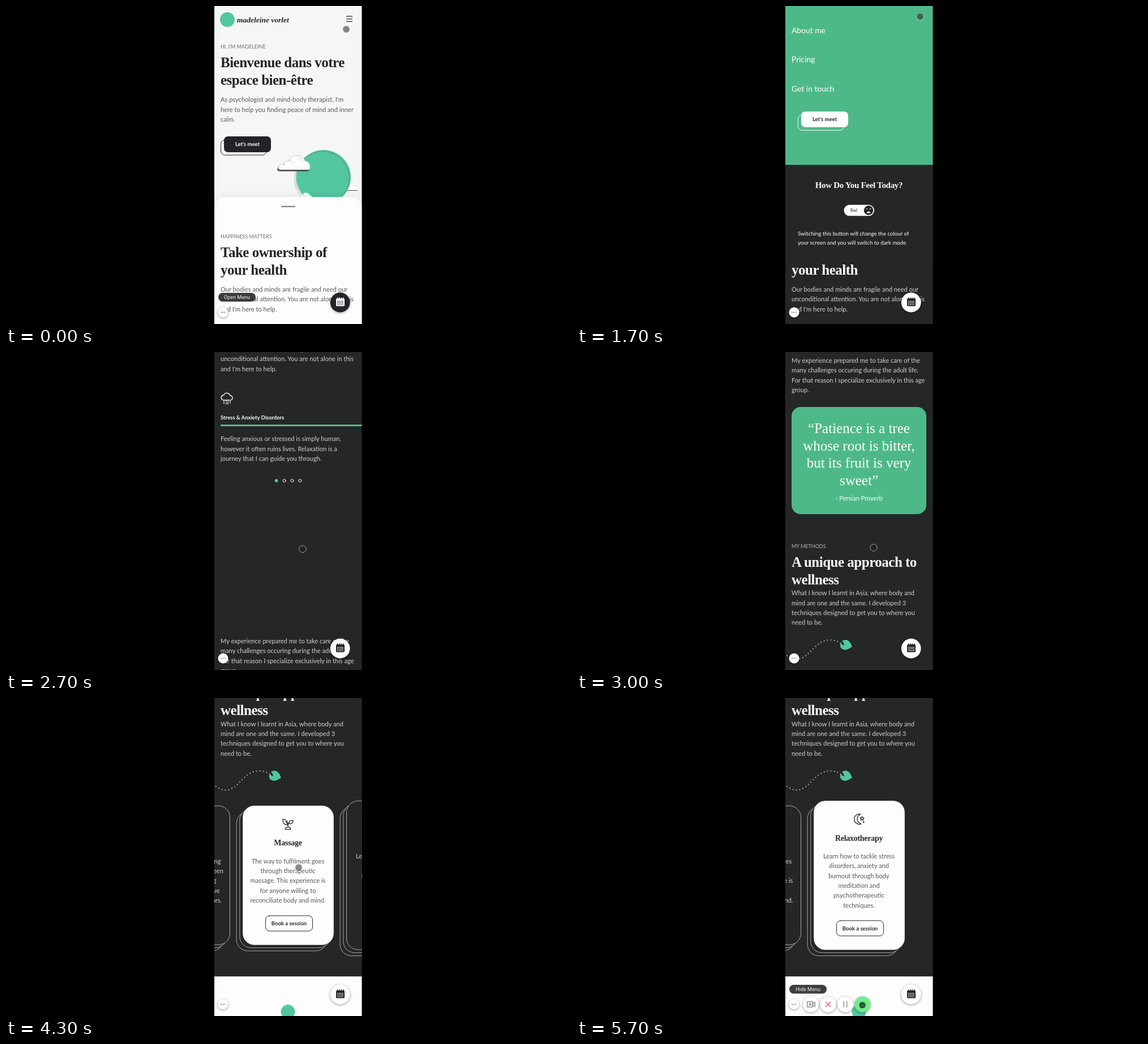
An HTML page for the animation above (5800 ms loop, 998 by 561 pixels).

```html
<!DOCTYPE html>
<html lang="en">
<head>
<meta charset="utf-8">
<title>Therapist site on a phone</title>
<style>
html, body { margin: 0; width: 100%; height: 100%; overflow: hidden; background: #000; }
svg { display: block; }
#stage {
  --hero: #f5f6f6; --sheet: #fdfdfd; --ink: #222426; --copy: #55585a; --soft: #6c6f71;
  --bar: #777; --cloud: #fcfcfc; --shade: #3a3c40; --btn: #232427; --btnInk: #fff;
}
#stage.dark {
  --hero: #1f2123; --sheet: #252727; --ink: #fbfbf8; --copy: #d0d1cf; --soft: #b4b5b2;
  --bar: #b9b7a6; --btn: #fdfdfd; --btnInk: #232427;
}
text { font: 11.09px Lato, sans-serif; fill: var(--copy); }
.h { font: bold 25px "Liberation Serif", serif; letter-spacing: -.02em; fill: var(--ink); }
.h.mid { font-size: 15px; }
.card .h { font-size: 14px; }
.quote { font: 25px "Liberation Serif", serif; fill: #fff; }
.cap { font-size: 9px; fill: var(--soft); }
.bold { font-size: 9.5px; font-weight: bold; fill: var(--ink); }
.name { font: italic bold 13.5px "Liberation Serif", serif; fill: var(--ink); }
.nav { font-size: 13.86px; fill: #fff; }
.note { font-size: 9.7px; fill: var(--ink); }
.mood { font-size: 7px; fill: var(--btnInk); }
.tip { font: 9px Roboto, sans-serif; fill: #eee; }
.mid { text-anchor: middle; }
.white { fill: #fff; }
.black { fill: #222426; }
.line { fill: none; stroke: var(--ink); stroke-width: 1.3; stroke-linecap: round; stroke-linejoin: round; }
.btn { fill: var(--btn); }
.btnInk { fill: var(--btnInk); }
.puff { fill: var(--cloud); }
.shadow { filter: drop-shadow(0 1px 2px #0006); }
.card { --ink: #e4e4e2; --copy: #d0d1cf; }
.card.on { --ink: #26282b; --copy: #55585a; }
.edge { fill: var(--sheet); stroke: #b9bab8; stroke-width: .9; }
</style>
</head>
<body>
<svg id="stage" width="998" height="561" viewBox="0 0 998 561"></svg>
<script>
const GREEN = '#4eb988', MINT = '#52c79f';
const stage = document.getElementById('stage');
const $ = id => document.getElementById(id);

const text = (x, y, s, cls = '') => `<text x="${x}" y="${y}" class="${cls}">${s}</text>`;
const lines = (x, y, list, cls = '', pitch = 17.33) =>
  list.map((s, i) => text(x, y + i * pitch, s, cls)).join('');
const rect = (x, y, w, h, r, more) =>
  `<rect x="${x}" y="${y}" width="${w}" height="${h}" rx="${r}" ${more}/>`;
const circle = (x, y, r, more) => `<circle cx="${x}" cy="${y}" r="${r}" ${more}/>`;
const path = (d, more = 'class="line"') => `<path d="${d}" ${more}/>`;
const at = (x, y, s, more = '') => `<g transform="translate(${x} ${y})" ${more}>${s}</g>`;

// Cloud with a flat base and a dark shadow down to the left
const CLOUD = 'M3 26 Q-2 25 1 19 Q4 15 10 17 Q11 9 19 10 Q23 -1 34 1 Q44 1 47 10 Q56 12 56 20 Q57 26 52 26Z';
const cloud = (x, y, k) => at(x, y, `<g transform="scale(${k})">` +
  path(CLOUD, 'fill="var(--shade)" transform="translate(-1.5 2.5)"') +
  path(CLOUD, 'class="puff" stroke="#aab" stroke-width=".6"') +
  path('M19 10 Q25 9 27 15 M34 6 Q40 5 43 12', 'fill="none" stroke="#bbc" stroke-width=".7"') + '</g>');

const hero = rect(368, 0, 261, 561, 0, 'fill="var(--hero)"') +
  circle(391, 24, 13, `fill="${MINT}"`) +
  text(408, 29, 'madeleine vorlet', 'name') +
  path('M601.5 18.2H611.5M601.5 22.8H611.5M601.5 27.4H611.5') +
  text(379, 75.3, "HI, I'M MADELEINE", 'cap') +
  lines(379, 108, ['Bienvenue dans votre', 'espace bien-être'], 'h', 30.5) +
  lines(379, 169.3, ["As psychologist and mind-body therapist, I'm",
    'here to help you finding peace of mind and inner', 'calm.']) +
  rect(379.5, 236.5, 80.5, 26.5, 7, 'class="line" style="stroke-width:1"') +
  rect(385, 230, 83, 28, 7, 'class="btn"') +
  text(426.5, 247.4, "Let's meet", 'bold mid btnInk') +
  cloud(596, 313, .46) +
  circle(561, 302, 48, `fill="${MINT}"`) +
  circle(559.5, 303.5, 47.5, 'fill="none" stroke="#4a7c70" stroke-width=".6"') +
  circle(557.5, 305, 48, 'fill="none" stroke="#8a9490" stroke-width=".6"') +
  cloud(481, 263, 1) + cloud(515, 329, .46);

const intro = circle(0, 0, 0, '') +
  text(379, 409.9, 'HAPPINESS MATTERS', 'cap') +
  lines(379, 443, ['Take ownership of', 'your health'], 'h', 30.5) +
  lines(379, 503.9, ['Our bodies and minds are fragile and need our',
    'unconditional attention. You are not alone in this', "and I'm here to help."]) +
  path('M384 590 Q380 589 380 585 Q381 581 385 581 Q386 577 390 577.5 Q395 578 396 582 Q400 582 400 586 Q400 590 396 590Z' +
    'M385 592V596M389 592V593M389 595V597M392 592V597M396 592V595') +
  text(379, 623.8, 'Stress &amp; Anxiety Disorders', 'bold') +
  rect(379, 633, 250, 3, 0, `fill="${GREEN}"`) +
  lines(379, 662.3, ['Feeling anxious or stressed is simply human,',
    'however it often ruins lives. Relaxation is a', 'journey that I can guide you through.']) +
  [0, 1, 2, 3].map(i => circle(477.6 + i * 13.9, 732, 2.5,
    i ? 'class="line" style="stroke-width:1"' : `fill="${MINT}" stroke="${MINT}"`)).join('');

const methods = lines(379, 18.9, ['My experience prepared me to take care of the',
    'many challenges occuring during the adult life.',
    'For that reason I specialize exclusively in this age', 'group.']) +
  rect(379, 97, 238, 189, 16, `fill="${GREEN}"`) +
  lines(498, 143, ['“Patience is a tree', 'whose root is bitter,', 'but its fruit is very', 'sweet”'], 'quote mid', 30.5) +
  text(498, 262, '- Persian Proverb', 'mid white') +
  text(379, 346.3, 'MY METHODS', 'cap') +
  lines(379, 379.3, ['A unique approach to', 'wellness'], 'h', 30.5) +
  lines(379, 429.3, ['What I know I learnt in Asia, where body and',
    'mind are one and the same. I developed 3',
    'techniques designed to get you to where you', 'need to be.']) +
  path('M366 532 Q378 542 389 542 C412 540 420 508 447 508 Q460 508 469 516',
    'fill="none" stroke="#e8e6d2" stroke-width="1.8" stroke-linecap="round" stroke-dasharray="0 6"') +
  path('M486 520 C481 523 477 526 473 525.5 C466 525 463 519 466 513 Q469 518 472 517 Q471 512 468 510 C475 505 482 508 486 520Z',
    `fill="${MINT}"`);

const rays = [0, 45, 90, 135, 180, 225, 270, 315]
  .map(a => `<path class="line" d="M0 -7.5V-9.5" transform="rotate(${a})"/>`).join('');
const cards = [
  ['Psychotherapy', circle(0, 0, 5.8, 'class="line"') + rays,
    ["I don't cure the mind using", "Freudian concepts. I've been", 'helping patients feeling',
      'better through alternative', 'therapies for over 20 years.']],
  ['Massage', path('M0 5Q0 -1 2 -3M0 2Q-1 -2 -4 -5M0 1Q-9 2 -9 -9Q0 -8 0 1M2 -1Q1 -7 9 -7Q9 0 2 -1M-5 9Q-4 5 0 5Q4 5 5 9Z'),
    ['The way to fulfilment goes', 'through therapeutic', 'massage. This experience is',
      'for anyone willing to', 'reconciliate body and mind.']],
  ['Relaxotherapy', path('M3 -9A9 9 0 1 0 4 8Q-3 6 -3 -1Q-3 -7 3 -9Z') +
    path('M5.5 -5L6.5 -2.8L9 -2.5L7.2 -.8L7.6 1.7L5.5 .5L3.4 1.7L3.8 -.8L2 -2.5L4.5 -2.8Z') +
    circle(8.2, 5, .8, 'class="line"'),
    ['Learn how to tackle stress', 'disorders, anxiety and', 'burnout through body',
      'meditation and', 'psychotherapeutic', 'techniques.']]
];
const card = ([title, icon, copy], i) => {
  const extra = (copy.length - 5) * 17.33, top = 1569.8 - extra / 2, h = 245 + extra;
  return at(i * 183, top, [2, 1, 0].map(k =>
      rect(418.5 - 5.7 * k, 5.4 * k, 160, h, 20, 'class="edge"')).join('') +
    rect(418.5, 0, 160, h, 20, 'fill="#fdfdfd" class="face"') +
    at(498, 32.4, icon) +
    text(498, 70, title, 'h mid') +
    lines(498, 101.3, copy, 'mid') +
    rect(458.5, 193.8 + extra, 83, 27, 7, 'class="line" style="stroke-width:1"') +
    text(500, 210.7 + extra, 'Book a session', 'bold mid'), 'class="card"');
};

const sheet = rect(368, 337, 260.5, 1600, 18, 'fill="var(--sheet)" style="filter:drop-shadow(0 -2px 6px #0001)"') +
  rect(486, 352.8, 25, 2, 1, 'fill="var(--bar)"') + intro + at(0, 1000, methods) +
  `<g id="deck">${cards.map(card).join('')}</g>` +
  rect(368, 1870.7, 261, 400, 0, 'fill="#fdfdfd"') +
  circle(498, 1933, 12.5, `fill="${MINT}"`);

let cells = '';
for (let r = 0; r < 3; r++) for (let c = 0; c < 4; c++)
  cells += rect(585.2 + c * 2.9, 520.3 + r * 2.8, 1.7, 1.6, .4, 'class="btn"');
const calendar = circle(590.2, 523, 17.4, 'class="btn shadow"') +
  rect(583, 516, 15, 13.5, 1.5, 'class="btnInk"') +
  [585, 588.4, 591.6, 595].map(x => rect(x, 514, 1.4, 3, .5, 'class="btnInk"')).join('') + cells;

const menu = rect(368, 0, 261, 393, 0, `fill="${GREEN}"`) +
  circle(391, 24, 13, 'fill="#fff"') +
  path('M602.7 19.2L609.3 25.8M609.3 19.2L602.7 25.8', 'class="line" style="stroke:#fff"') +
  lines(379, 108.6, ['Home', 'About me', 'Pricing', 'Get in touch'], 'nav', 51.5) +
  rect(390.5, 304.5, 80.5, 27, 7, 'fill="none" stroke="#fff" stroke-width=".9"') +
  rect(396, 298.5, 83, 27.5, 7, 'fill="#fff"') +
  text(437.5, 315.6, "Let's meet", 'bold mid black') +
  rect(368, 392.5, 261, 169, 0, 'fill="var(--sheet)"') +
  text(498, 433, 'How Do You Feel Today?', 'h mid') +
  rect(471.5, 463, 53.5, 19.5, 9.7, 'class="btn"') +
  '<text id="mood" y="475.2" class="mood"></text>' +
  `<g id="knob">${circle(481.5, 472.7, 8.2, 'class="btnInk"')}
    <path id="mouth" class="btn"/>
    ${path('M476.8 470.5Q478.3 468.8 479.8 470.5M483.2 470.5Q484.7 468.8 486.2 470.5', 'fill="none" stroke="var(--btn)"')}</g>` +
  lines(390, 517.4, ['Switching this button will change the colour of',
    'your screen and you will switch to dark mode'], 'note', 15.4);

// Recorder tools that spread out from the dots button
const disc = (fill = '#fff') => circle(0, 0, 14, `fill="${fill}" class="shadow"`);
const icon = (d, color) => path(d, `fill="none" stroke="${color}" stroke-width="1.4"`);
const tools = [
  disc() + icon('M-6.5 -4.5H3V4.5H-6.5ZM3 -1L7 -3.5V3.5L3 1M-4 0H1M-1.5 -2.5V2.5', '#888'),
  disc() + icon('M-4.5 -4.5L4.5 4.5M4.5 -4.5L-4.5 4.5', '#e8606a'),
  disc() + icon('M-2.8 -5.5V5.5M2.8 -5.5V5.5', '#85898f'),
  disc('#6cf088') + circle(0, 1, 6, 'fill="#2e8a4c"') + icon('M-2.5 1L-.5 3L3 -1', '#6cf088')
];
const recorder = tools.map(s => at(0, 540.5, s, 'class="tool"')).join('') +
  circle(383.5, 540.5, 9, 'fill="#fff" class="shadow"') +
  [380.2, 383.5, 386.8].map(x => circle(x, 540.3, .9, 'fill="#555"')).join('') +
  `<g id="tip">${rect(375, 506, 66, 15.5, 7.7, 'fill="#242424" fill-opacity=".88"')}
    <text id="tipText" x="408" y="516.8" class="tip mid"></text></g>`;

stage.innerHTML = `<svg x="368" width="260.5" height="561" viewBox="368 0 260.5 561">
  ${hero}<g id="sheet">${sheet}</g>${calendar}<g id="menu">${menu}</g>${recorder}
  <circle id="cursor" r="6.1" fill="#1c1c1c" fill-opacity=".52" stroke="#ccc" stroke-opacity=".75"/></svg>`;

// Keys are [time, value, ...]; values run straight between them
function track(keys, t) {
  let i = keys.findIndex(k => k[0] > t);
  if (i < 0) return keys[keys.length - 1].slice(1);
  if (!i) return keys[0].slice(1);
  const a = keys[i - 1], b = keys[i], f = (t - a[0]) / (b[0] - a[0]);
  return a.slice(1).map((v, j) => v + (b[j + 1] - v) * f);
}

const CURSOR = [[0, 601, 41], [200, 610, 26], [500, 608, 24], [700, 590, 120], [1000, 495, 476], [1200, 495, 476],
  [1500, 606, 18.5], [1700, 606, 18.5], [2200, 524, 350], [2400, 524, 350], [3000, 524, 345], [3400, 524, 345],
  [3700, 517, 299], [4800, 517, 299], [5200, 384, 540], [5400, 384, 540], [5700, 504, 542]];
const SCROLL = [[2200, 0], [2300, 80], [2400, 212.5], [2600, 450], [2800, 560], [2900, 740], [3000, 1000],
  [3100, 1130], [3200, 1215], [3300, 1260], [3400, 1278], [3600, 1365], [3700, 1379.5]];
const SWIPE = [[3700, 0], [3800, .3], [3900, .65], [4000, .85], [4200, 1], [4300, 1],
  [4400, 1.2], [4500, 1.55], [4600, 1.85], [4700, 1.95], [4900, 2]];
const MENU = [[400, 0], [500, .15], [600, .55], [700, .85], [800, 1], [1600, 1], [1700, .8], [1800, .4], [1900, .1], [2000, 0]];
const KNOB = [[1100, 0], [1300, 1]];
const TOOLS = [[5200, 0], [5300, .3], [5400, .75], [5500, 1]];

const move = (el, x, y) => el.setAttribute('transform', `translate(${x} ${y})`);
const deckCards = [...document.querySelectorAll('.card')];
const toolDiscs = [...document.querySelectorAll('.tool')];

function draw(t) {
  const [swipe] = track(SWIPE, t), [open] = track(MENU, t), [knob] = track(KNOB, t), [spread] = track(TOOLS, t);
  const dark = knob >= .5;
  stage.classList.toggle('dark', dark);
  move($('sheet'), 0, -track(SCROLL, t)[0]);
  move($('deck'), -183 * swipe, 0);
  deckCards.forEach((el, i) => {
    const on = Math.max(0, 1 - Math.abs(i - swipe));
    el.classList.toggle('on', on > .5);
    el.querySelector('.face').setAttribute('opacity', on);
  });

  move($('menu'), 0, -561 * (1 - open));
  move($('knob'), 33.5 * knob, 0);
  $('mood').textContent = dark ? 'Bad' : 'Good';
  $('mood').setAttribute('x', dark ? 483 : 495);
  $('mouth').setAttribute('d', dark ? 'M477.5 477.5Q481.5 471.5 485.5 477.5Z' : 'M477 473H486Q485 478 481.5 478Q478 478 477 473Z');

  toolDiscs.forEach((el, i) => {
    move(el, 383.5 + (29.7 + 30.4 * i) * spread, 540.5);
    el.setAttribute('opacity', spread ? 1 : 0);
  });
  $('tip').setAttribute('opacity', t < 100 || t >= 5200 ? 1 : 0);
  $('tipText').textContent = spread ? 'Hide Menu' : 'Open Menu';
  move($('cursor'), ...track(CURSOR, t));
}

const start = performance.now();
function tick() {
  draw(Math.floor((performance.now() - start) % 5800 / 100) * 100);
  requestAnimationFrame(tick);
}
tick();
</script>
</body>
</html>
```
